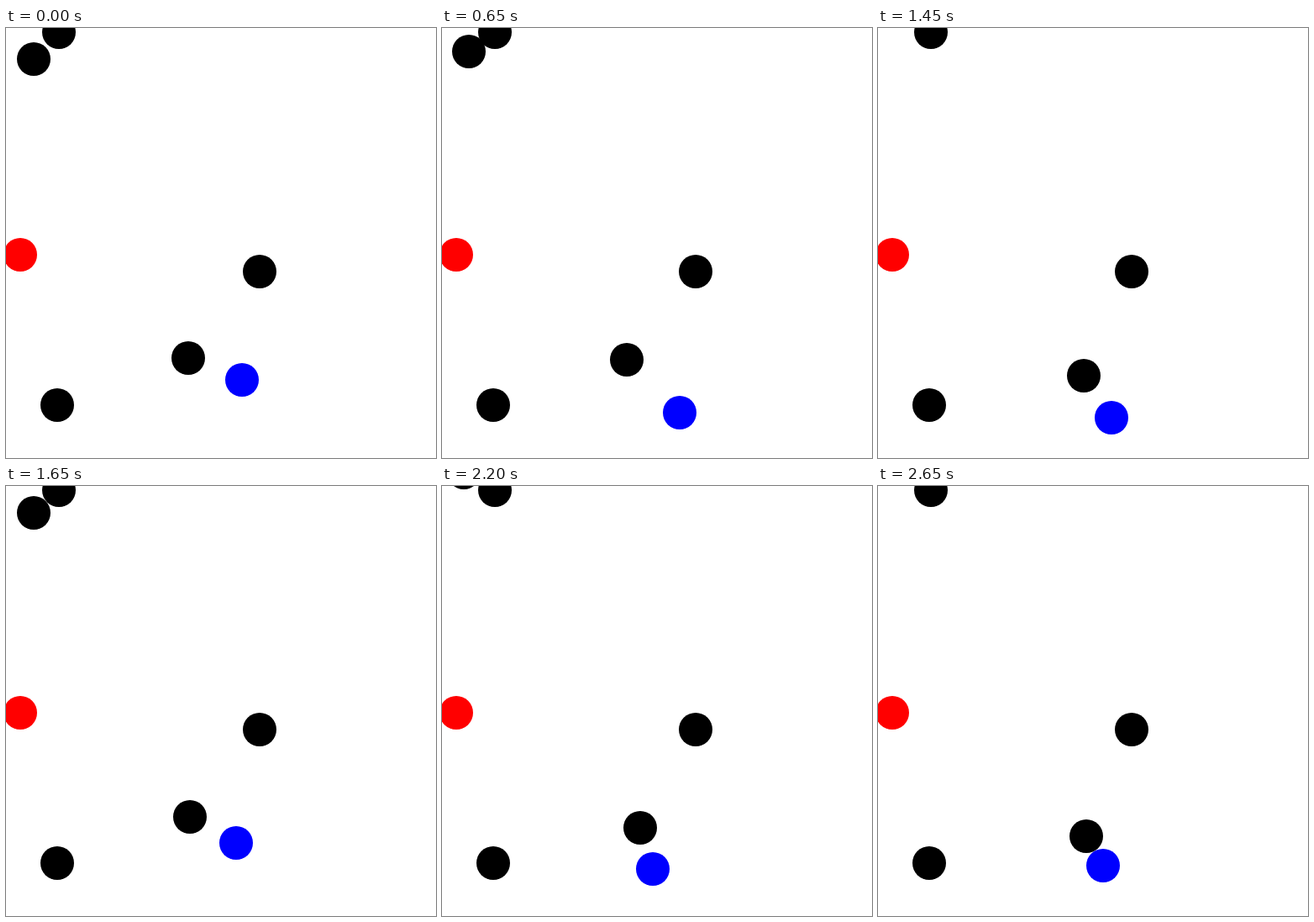
An HTML page with a canvas for the animation above (2.7 s loop, 512x512 px).

```html
<!DOCTYPE html>
<html>
<head>
<meta charset="utf-8">
<style>
  html, body { margin: 0; width: 100%; height: 100%; overflow: hidden; background: #fff; }
  canvas { display: block; }
</style>
</head>
<body>
<canvas id="stage" width="512" height="512"></canvas>
<script>
const ctx = document.getElementById('stage').getContext('2d');
const STEP = 50, STEPS = 54, RADIUS = 20;

const obstacles = [[63, 5], [302, 290], [61, 449]];
const goal = [17, 270];

// Each run restarts all movers; the blue path is [step, x, y] waypoints.
const runs = [
  { start: 0, path: [[0, 281, 419], [4, 294, 437], [7, 279, 452], [10, 260, 436]] },
  { start: 11, path: [[0, 281, 419], [2, 283, 458], [6, 307, 470], [10, 303, 475],
                      [11, 301, 488], [18, 278, 464], [20, 270, 450]] },
  { start: 32, path: [[0, 281, 419], [1, 274, 425], [6, 265, 445], [12, 251, 456],
                      [17, 276, 474], [21, 268, 452]] },
];

function along(path, step) {
  const i = Math.max(1, path.findIndex(p => p[0] >= step));
  const [s0, x0, y0] = path[i - 1], [s1, x1, y1] = path[i];
  const k = (step - s0) / (s1 - s0);
  return [x0 + (x1 - x0) * k, y0 + (y1 - y0) * k];
}

function ball([x, y], color) {
  ctx.fillStyle = color;
  ctx.beginPath();
  ctx.arc(Math.floor(x), Math.floor(y), RADIUS, 0, Math.PI * 2);
  ctx.fill();
}

function draw(time) {
  const tick = Math.floor(time / STEP) % STEPS;
  const run = runs.filter(r => r.start <= tick).pop();
  const step = tick - run.start;
  const blocked = Math.min(step, 20); // stops on touching blue

  ctx.clearRect(0, 0, 512, 512);
  obstacles.forEach(p => ball(p, '#000'));
  ball([33.8 - 0.62 * step, 37.2 - 4.4 * step], '#000');
  ball([217.7 + 1.55 * blocked, 393.4 + 1.19 * blocked], '#000');
  ball(goal, '#f00');
  ball(along(run.path, step), '#00f');
}

const began = performance.now();
function loop() {
  draw(performance.now() - began);
  requestAnimationFrame(loop);
}
loop();
</script>
</body>
</html>
```
